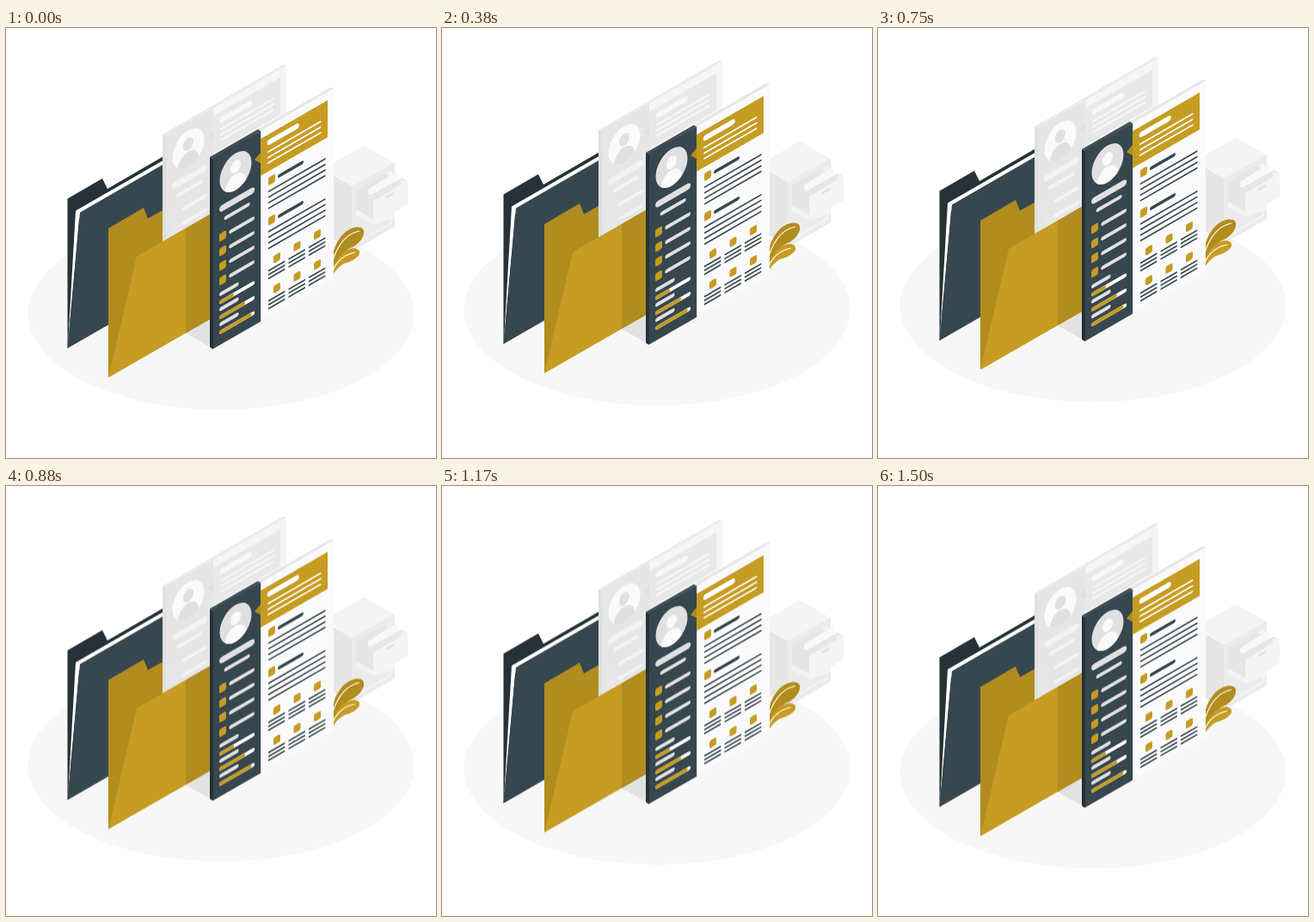
These frames come from a looping animation (500 by 500 pixels, 1.54 s). An HTML page without scripts:

```html
<!DOCTYPE html>
<html lang="en">
<head>
<meta charset="utf-8">
<title>Folders and résumés</title>
<style>
  html, body { margin: 0; width: 100%; height: 100%; overflow: hidden; background: #fff; }
  svg { display: block; width: 100vw; height: 100vh; }

  .float { animation: float 1540ms infinite; }
  /* Film-rate steps: up, then down, just over half a pixel each */
  @keyframes float {
    0%      { transform: translateY(0); animation-timing-function: steps(18, end); }
    48.649% { transform: translateY(-10px); }
    48.65%  { transform: translateY(-9px); animation-timing-function: steps(19, end); }
    100%    { transform: translateY(1.26px); }
  }

  .dark {
    --paper: #fafafa; --rim: #e6e6e6;
    --panel: #37474f; --panel-top: #3f5059; --side: #263238;
    --accent: #c69c22; --tip: #b18c1e; --banner-text: #fff;
    --ink: #37474f; --bar: #e0e0e0; --rest: #fff;
    --disc: #e0e0e0; --person: #fafafa;
  }
  .pale {
    --paper: #f5f5f5; --rim: #ebebeb;
    --panel: #e6e6e6; --panel-top: #ebebeb; --side: #e0e0e0;
    --accent: #e8e8e8; --tip: #e0e0e0; --banner-text: #f8f8f8;
    --ink: #e0e0e0; --bar: #f3f3f3; --rest: #fafafa;
    --disc: #fafafa; --person: #e0e0e0;
  }
  .pale .mark { --accent: #f5f5f5; }

  .accent { fill: var(--accent); }
  .bar, .ink, .text, .rest, .done { fill: none; stroke-linecap: round; }
  .bar { stroke: var(--bar); stroke-width: 4.4; }
  .ink { stroke: var(--ink); stroke-width: 1.9; stroke-linecap: butt; }
  .text { stroke: var(--banner-text); stroke-width: 2; }
  .rest { stroke: var(--rest); stroke-width: 4.4; }
  .done { stroke: var(--accent); stroke-width: 4.4; }
  .gold { fill: #c69c22; }
  .gold-deep { fill: #b18c1e; }
</style>
</head>
<body>
<svg viewBox="0 0 500 500">
  <defs>
    <clipPath id="disc"><ellipse cx="26" cy="31" rx="18.5" ry="21.4"/></clipPath>
    <clipPath id="inside"><path d="M150 0H340V200L152 300Z"/></clipPath>

    <g id="contact">
      <rect class="accent" x="7" y="-4.7" width="8" height="9.4" rx="2"/>
      <path class="bar" d="M20.5 0H45.8"/>
    </g>

    <g id="skill">
      <path class="bar" d="M9.2 0H27.4"/>
      <path class="rest" d="M9.2 9.3H46"/>
    </g>

    <g id="section">
      <rect class="accent" x="64" y="-4.7" width="8" height="9.4" rx="2"/>
      <path class="ink" style="stroke-width:4;stroke-linecap:round" d="M77 .5H103"/>
      <path class="ink" d="M64 11.6H130.5M64 18.1H130.5M64 24.6H130.5M64 31.1H130.5"/>
    </g>

    <g id="cell">
      <rect class="accent" x="6" y="-4.5" width="8" height="9" rx="2"/>
      <path class="ink" d="M0 9.4H19.3M0 13.9H19.3M0 18.4H19.3"/>
    </g>

    <g id="cells">
      <use href="#cell" x="64"/>
      <use href="#cell" x="87.5"/>
      <use href="#cell" x="111"/>
    </g>

    <g id="page">
      <path fill="var(--side)" d="M-4 -1L0 1V222L-1 222.3L-4 220Z"/>
      <path fill="var(--panel-top)" d="M-4 -1L52 -33.3L55.3 -31.7L0 1Z"/>
      <path fill="var(--rim)" d="M52 -33.3L135.5 -81.4Q138 -82.6 140 -80.6L55 -31Z"/>
      <g transform="skewY(-30)">
        <rect x="55" y=".5" width="85" height="221.5" fill="var(--paper)"/>
        <rect width="55.2" height="222" fill="var(--panel)"/>

        <ellipse cx="26" cy="31" rx="18.5" ry="21.4" fill="var(--disc)"/>
        <g fill="var(--person)" clip-path="url(#disc)">
          <ellipse cx="26" cy="25.2" rx="6" ry="7.2"/>
          <ellipse cx="26" cy="48.5" rx="12.3" ry="14.5"/>
        </g>
        <path class="bar" style="stroke-width:7.5" d="M10.8 64.4H44.4"/>
        <path class="bar" d="M14.8 78H40.5"/>
        <g class="mark">
          <use href="#contact" y="97.3"/>
          <use href="#contact" y="114.3"/>
          <use href="#contact" y="131.3"/>
          <use href="#contact" y="148.3"/>
        </g>
        <use href="#skill" y="163.3"/>
        <use href="#skill" y="180.8"/>
        <use href="#skill" y="198.3"/>
        <path class="done" d="M9.2 172.6H22M9.2 190.1H35M9.2 207.6H42.5"/>

        <rect class="accent" x="55" y="9.7" width="78" height="43"/>
        <path fill="var(--tip)" d="M48 30L55 25.5V38Z"/>
        <path class="text" style="stroke-width:6.6" d="M66 19.4H96.5"/>
        <path class="text" d="M64 30H124.5M64 36.4H124.5M64 42.8H124.5"/>

        <use href="#section" y="64.7"/>
        <use href="#section" y="111.4"/>
        <use href="#cells" y="159"/>
        <use href="#cells" y="194"/>
      </g>
    </g>
  </defs>

  <g class="float">
    <ellipse cx="250" cy="332" rx="224.5" ry="112" fill="#f7f7f7"/>

    <!-- Cabinet -->
    <path fill="#f4f4f4" d="M370 163L416 136.5L452 157L404 185Z"/>
    <path fill="#e6e6e6" d="M370 165L404 185V259L370 240Z"/>
    <path fill="#ebebeb" d="M402 184L452 156.5V231L404 259L402 258Z"/>
    <path fill="#f3f3f3" d="M407 189L449 165V228L407 252Z"/>
    <path fill="#e6e6e6" d="M407 188L440 169L449 174V205L427 222L407 211Z"/>
    <path fill="#ebebeb" d="M407 218L427 228L447 217V226L407 249Z"/>
    <path fill="#f8f8f8" d="M421 188L452 168L455 167V179L427 196L421 193Z"/>
    <path fill="#e6e6e6" d="M423 195L460 174L467 178L427 201Z"/>
    <path fill="#f4f4f4" d="M427 201L459 182V177L467 178V205L452 214V220L427 229Z"/>
    <path stroke="#e0e0e0" stroke-width="2.5" d="M442 197L451 192"/>

    <!-- Plant -->
    <path class="gold-deep" d="M378 270Q385 236 407 231.5Q418 230.5 416 240Q412 252 398 257Q387 264 379 282Z"/>
    <path class="gold" d="M379 283Q387 257 405 256Q413 257 410.5 264Q405 271 393 274Q385 278 379 289Z"/>
    <path fill="none" stroke="#fff" stroke-width="1.2" d="M380 270Q390 240 411 236M380 282Q388 264 406 261"/>

    <!-- Slate folder -->
    <path fill="#263238" d="M71.5 198.5L112 175L118 187L186 147.5V300L71.5 372Z"/>
    <path fill="#fff" d="M81 212.5L186 152V165L85 222L72 368Z"/>
    <path fill="#37474f" d="M86 214.5L186 156.8V306.5L71.5 372.5Z"/>

    <!-- Gold folder with the pale page inside -->
    <path class="gold-deep" d="M119 233L160 209L165 221.500L240 179V335L119 406Z"/>
    <g clip-path="url(#inside)">
      <use href="#page" class="pale" x="186" y="124.5"/>
    </g>
    <path fill="#e2e2e2" d="M209 340L241 330V373L209 355Z"/>
    <path class="gold" d="M152 265.5L240 215V337L119 406.5Z"/>
    <path class="gold-deep" d="M209 233L240 215V337L209 354.8Z"/>

    <use href="#page" class="dark" x="241" y="151"/>
  </g>
</svg>
</body>
</html>
```
